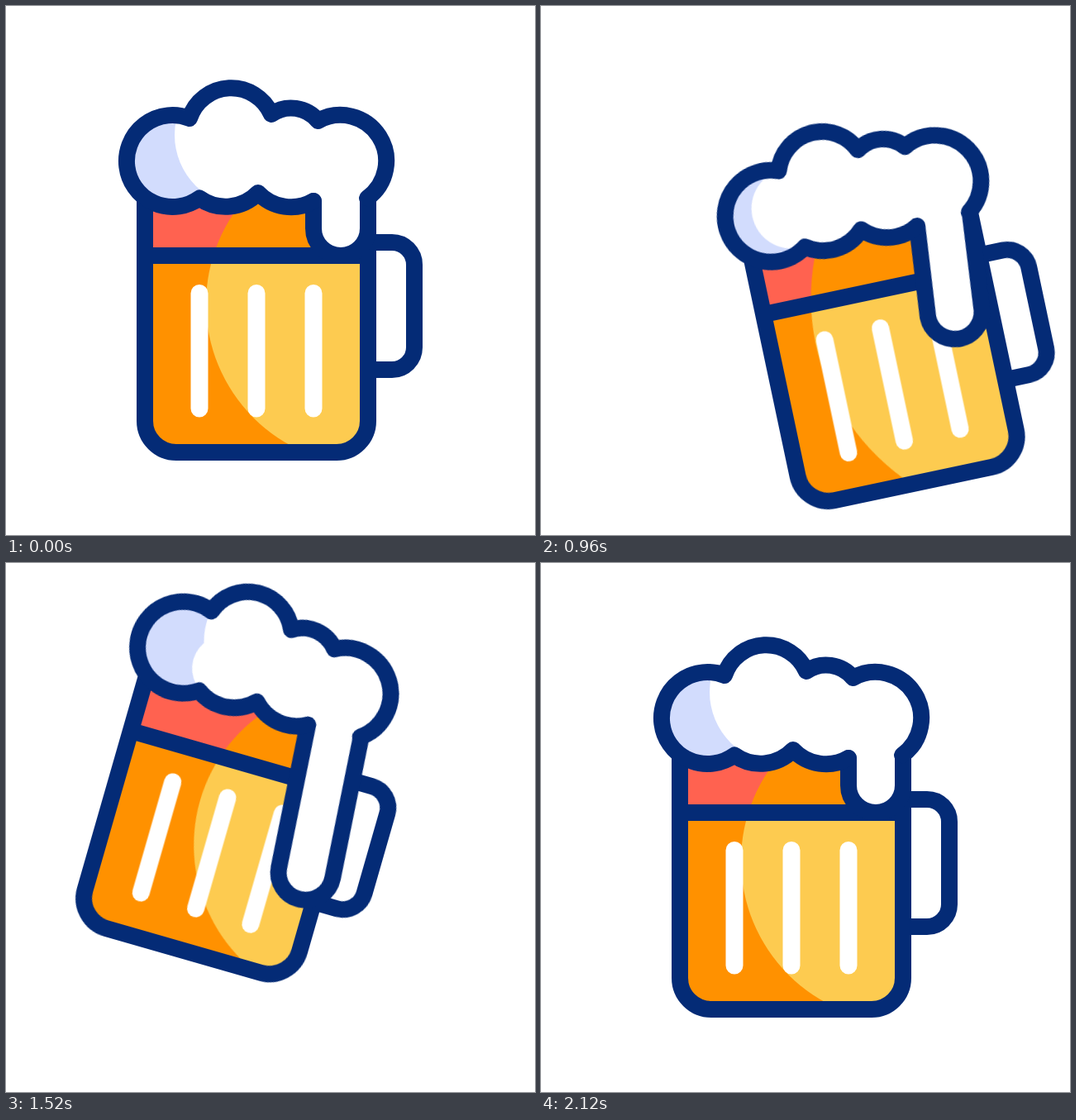
Recreate the animation shown at these times as an HTML page without scripts. Size 640 px wide and 640 px high, loop 2.5 s.

```html
<!DOCTYPE html>
<html lang="en">
<head>
<meta charset="utf-8">
<title>Beer mug</title>
<style>
html, body { margin: 0; width: 100%; height: 100%; overflow: hidden; background: #fff; }
svg { display: block; width: 100vw; height: 100vh; }

.ink { fill: none; stroke: #042b76; stroke-width: 20; stroke-linecap: round; stroke-linejoin: round; }
.bars { fill: none; stroke: #fff; stroke-width: 21; stroke-linecap: round; }
.red { fill: #ff6250; }
.orange { fill: #ff9100; }
.yellow { fill: #fdcb50; }
.blue { fill: #d2dcfd; }
.white { fill: #fff; }

.move-x, .move-y, .tilt, .slosh, .gloss, .bump, .drip, .splash {
  animation: 2.5s ease-in-out infinite;
}

.move-x { animation-name: move-x; }
@keyframes move-x {
  0%, 22.4%, 84.8%, 100% { transform: translateX(0); }
  40.4% { transform: translateX(104px); }
  60.2%, 61.2% { transform: translateX(-28px); }
}

.move-y { animation-name: move-y; }
@keyframes move-y {
  0%, 22.4%, 84.8%, 100% { transform: translateY(0); }
  41.6% { transform: translateY(41.5px); }
  48.2% { transform: translateY(41.5px); animation-timing-function: cubic-bezier(.42, 0, .5, 1); }
  63.8%, 65% { transform: translateY(-63.5px); }
}

.tilt { animation-name: tilt; transform-origin: 320px 320px; }
@keyframes tilt {
  0%, 22.4%, 84.8%, 100% { transform: rotate(0deg); }
  40.9% { transform: rotate(-12.4deg); }
  62% { transform: rotate(16.2deg); animation-timing-function: cubic-bezier(.28, 0, .58, 1); }
}

/* light side of the beer */
.slosh { animation-name: slosh; }
@keyframes slosh {
  0%, 1.6%, 20.8%, 22.4%, 84.8%, 100% { cx: 437px; cy: 360px; r: 195px; }
  11.2% { cx: 403px; cy: 360px; r: 195px; }
  40.4% { cx: 492px; cy: 350px; r: 270px; animation-timing-function: cubic-bezier(.5, 0, .58, 1); }
  61.2% { cx: 467px; cy: 360px; r: 195px; animation-timing-function: cubic-bezier(.28, 0, .58, 1); }
}

/* light side of the foam */
.gloss { animation-name: gloss; }
@keyframes gloss {
  0%, 22.4%, 84.8%, 100% { cx: 291px; cy: 156px; r: 87px; }
  40% { cx: 227px; cy: 184px; r: 48px; animation-timing-function: ease-in; }
  50.4% { cx: 248px; cy: 184px; r: 56px; animation-timing-function: ease-out; }
  60.8% { cx: 307px; cy: 150px; r: 87px; animation-timing-function: ease-in; }
  72% { cx: 297px; cy: 168px; r: 87px; animation-timing-function: ease-out; }
}

.bump { animation-name: bump; }
@keyframes bump {
  0%, 50.4%, 84.8%, 100% { cx: 270px; }
  60.8% { cx: 257px; }
}

.drip { animation-name: drip; animation-timing-function: linear; }
@keyframes drip {
  0%, 1.6%, 84.8%, 100% { d: path("M372 236 L372 269 A33 33 0 0 0 438 269 L438 232"); }
  22.4% { d: path("M372 236 L372 314 A33 33 0 0 0 438 314 L438 232"); }
  38.4% { d: path("M372 236 L362 346.5 A33 33 0 0 0 427.5 352.5 L438 232"); }
  44% { d: path("M372 236 L362.6 360.5 A33 33 0 0 0 428.4 365.5 L438 232"); }
  50.4% { d: path("M372 236 L370 377.5 A33 33 0 0 0 436 378.5 L438 232"); }
  60.8% {
    d: path("M372 236 L386 411 A33 33 0 0 0 452 406 L438 232");
    animation-timing-function: cubic-bezier(.25, 0, .55, 1);
  }
}

.splash {
  fill: none; stroke: #fdcb50; stroke-width: 21; stroke-linecap: round;
  animation-name: splash; animation-timing-function: linear;
}
@keyframes splash {
  0%, 62.39% { opacity: 0; stroke-dasharray: 0 200; stroke-dashoffset: 0; }
  62.4% { opacity: 1; stroke-dasharray: 0 200; stroke-dashoffset: 0; }
  65.6% { stroke-dasharray: 57 200; stroke-dashoffset: -25; }
  72% { stroke-dasharray: 24 200; stroke-dashoffset: -70; }
  76% { opacity: 1; stroke-dasharray: 0 200; stroke-dashoffset: -100; }
  76.01%, 100% { opacity: 0; stroke-dasharray: 0 200; stroke-dashoffset: -100; }
}
</style>
</head>
<body>
<svg viewBox="0 0 640 640">
  <defs>
    <path id="top" d="M168 226 H438 V302 H168 Z"/>
    <path id="beer" d="M168 302 H438 V502 a38 38 0 0 1 -38 38 H206 a38 38 0 0 1 -38 -38 Z"/>
    <path id="foam" d="M437 232.5 A55.5 55.5 0 0 0 377.5 139 A42 42 0 0 0 321 131 A53 53 0 0 0 222 136 A55.5 55.5 0 1 0 234 232.5 A54.5 54.5 0 0 0 305 226 A54.5 54.5 0 0 0 372 236"/>
    <clipPath id="in-top"><use href="#top"/></clipPath>
    <clipPath id="in-beer"><use href="#beer"/></clipPath>
    <clipPath id="in-foam"><use href="#foam"/></clipPath>
  </defs>

  <path class="splash" pathLength="100" opacity="0" d="M128 109 A73 73 0 0 0 23 157"/>

  <g class="move-x"><g class="move-y"><g class="tilt">
    <path class="ink" d="M438 286 H467 a27 27 0 0 1 27 27 V413 a27 27 0 0 1 -27 27 H438"/>

    <use href="#top" class="red"/>
    <use href="#beer" class="orange"/>
    <g clip-path="url(#in-top)"><circle class="slosh orange" cx="437" cy="360" r="195"/></g>
    <g clip-path="url(#in-beer)"><circle class="slosh yellow" cx="437" cy="360" r="195"/></g>
    <path class="bars" d="M234 347.5 V487 M303 347.5 V487 M372 347.5 V487"/>
    <path class="ink" d="M168 232 V502 a38 38 0 0 0 38 38 H400 a38 38 0 0 0 38 -38 V232 M168 302 H438"/>

    <use href="#foam" class="white"/>
    <g clip-path="url(#in-foam)">
      <circle class="blue" cx="201.5" cy="187.5" r="55.5"/>
      <circle class="gloss white" cx="291" cy="156" r="87"/>
      <circle class="bump white" cx="270" cy="198" r="40"/>
    </g>
    <!-- the patch hides the seam between foam and drip -->
    <path class="drip white" d="M372 236 L372 269 A33 33 0 0 0 438 269 L438 232"/>
    <path class="white" d="M374 222 H436 V244 H374 Z"/>
    <path class="ink drip" d="M372 236 L372 269 A33 33 0 0 0 438 269 L438 232"/>
    <use href="#foam" class="ink"/>
  </g></g></g>
</svg>
</body>
</html>
```
